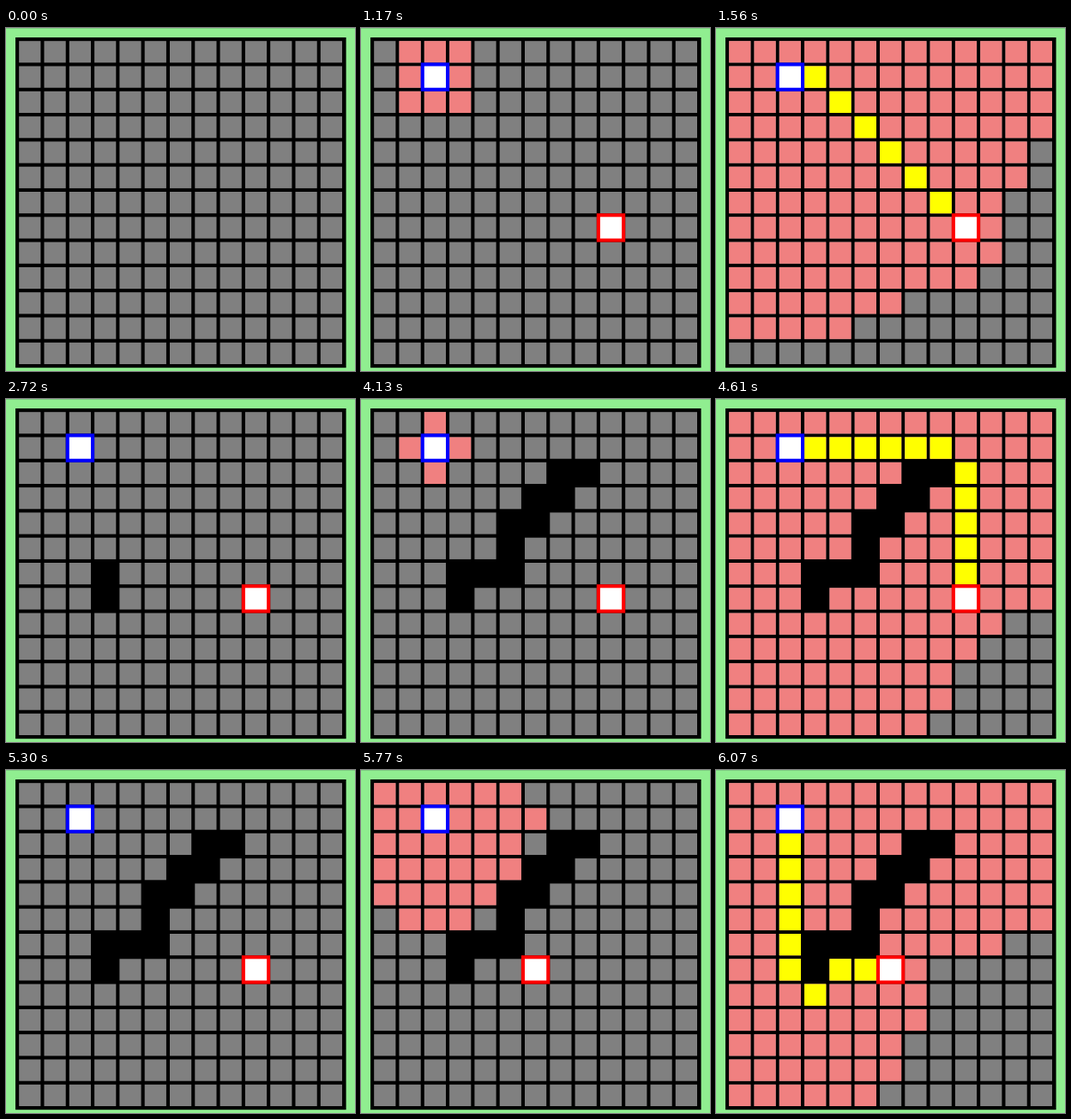
An HTML page with a canvas that plays this animation: 407x400 px, repeating every 6950 ms.

```html
<!DOCTYPE html>
<html lang="en">
<head>
<meta charset="utf-8">
<title>Shortest path on a grid</title>
<style>
  html, body { margin: 0; width: 100%; height: 100%; overflow: hidden; background: #90ee90; }
  canvas { display: block; width: 407px; height: 400px; }
</style>
</head>
<body>
<canvas id="stage" width="407" height="400"></canvas>
<script>
const LOOP = 6950;
const N = 13, ORIGIN = 15.2, PITCH = 29.3, SIZE = 25.2, LINE = 4.1;
const START = [2, 1], START_AT = 300, END_AT = 690;

// [time, column, row]
const walls = [
  [2720, 3, 7], [2720, 3, 6], [2800, 4, 6], [2950, 5, 6], [2950, 5, 5],
  [3180, 5, 4], [3180, 6, 4], [3330, 6, 3], [3410, 7, 3], [3560, 7, 2], [3730, 8, 2]
];
const endMoves = [[END_AT, 9, 7], [5380, 8, 7], [5460, 7, 7], [5540, 6, 7]];

// Each search shows "first" cells at its first step and everything at its last.
const searches = [
  { steps: [1170, 1250, 1330, 1400, 1480, 1560], clear: 2720, first: 8 },
  { steps: [4130, 4200, 4280, 4360, 4440, 4530, 4610], clear: 5300, first: 4 },
  { steps: [5690, 5770, 5840, 5920, 5990, 6070], clear: LOOP, first: 8 }
];

const directions = [
  [0, -1], [1, 0], [0, 1], [-1, 0],
  [1, -1], [1, 1], [-1, 1], [-1, -1]
];

const ctx = document.getElementById("stage").getContext("2d");
const inside = (x, y) => x >= 0 && y >= 0 && x < N && y < N;
const wallsAt = t => walls.filter(w => w[0] <= t);
const endAt = t => endMoves.filter(m => m[0] <= t).pop();

// Dijkstra with diagonal moves; returns cells in the order they are coloured.
function search(end, blocked) {
  const nodes = new Map();
  const id = (x, y) => y * N + x;
  const closed = new Set(blocked.map(([, x, y]) => id(x, y)));
  const rank = n => n.d + n.x * 1e-4 + n.y * 1e-6;
  const goal = id(...end);
  const found = [];
  const open = [{ x: START[0], y: START[1], d: 0, from: null }];
  nodes.set(id(...START), open[0]);

  while (open.length) {
    open.sort((a, b) => rank(a) - rank(b));
    const node = open.shift();
    for (const [dx, dy] of directions) {
      const x = node.x + dx, y = node.y + dy, key = id(x, y);
      if (!inside(x, y) || closed.has(key)) continue;
      const d = node.d + Math.hypot(dx, dy);
      const known = nodes.get(key);
      if (!known) {
        const next = { x, y, d, from: node };
        nodes.set(key, next);
        open.push(next);
        if (key !== goal) found.push([x, y, "#f08080"]);
      } else if (known.from) {
        const gap = d - known.d;
        const tie = Math.abs(gap) < 1e-6 && node.y < known.from.y;
        if (gap < -1e-6 || tie) Object.assign(known, { d, from: node });
      }
    }
    if (id(node.x, node.y) === goal) break;
  }

  const path = [];
  for (let n = nodes.get(goal).from; n.from; n = n.from) path.unshift([n.x, n.y, "#ffff00"]);
  return found.concat(path);
}

for (const s of searches) {
  const t = s.steps[0];
  s.cells = search(endAt(t).slice(1), wallsAt(t));
}

function cell(x, y, color, grow = 0) {
  ctx.fillStyle = color;
  ctx.fillRect(ORIGIN + x * PITCH - grow, ORIGIN + y * PITCH - grow, SIZE + 2 * grow, SIZE + 2 * grow);
}

function marker(x, y, color) {
  cell(x, y, color, LINE);
  cell(x, y, "#fff");
}

function draw(t) {
  ctx.fillStyle = "#90ee90";
  ctx.fillRect(0, 0, 407, 400);
  ctx.fillStyle = "#7fcb82";
  ctx.fillRect(0, 0, 407, 1);
  ctx.fillStyle = "#000";
  ctx.fillRect(11, 11, 385.6, 385.2);

  for (let y = 0; y < N; y++)
    for (let x = 0; x < N; x++) cell(x, y, "#808080");

  const run = searches.find(s => t >= s.steps[0] && t < s.clear);
  if (run) {
    const step = run.steps.filter(at => at <= t).length - 1;
    const part = step / (run.steps.length - 1);
    const shown = Math.round(run.first + (run.cells.length - run.first) * part);
    run.cells.slice(0, shown).forEach(c => cell(...c));
  }

  for (const [, x, y] of wallsAt(t)) cell(x, y, "#000", 1);
  if (t >= START_AT) marker(...START, "#0000ff");
  const end = endAt(t);
  if (end) marker(end[1], end[2], "#ff0000");
}

const begin = performance.now();
function tick() {
  draw((performance.now() - begin) % LOOP);
  requestAnimationFrame(tick);
}
tick();
</script>
</body>
</html>
```
